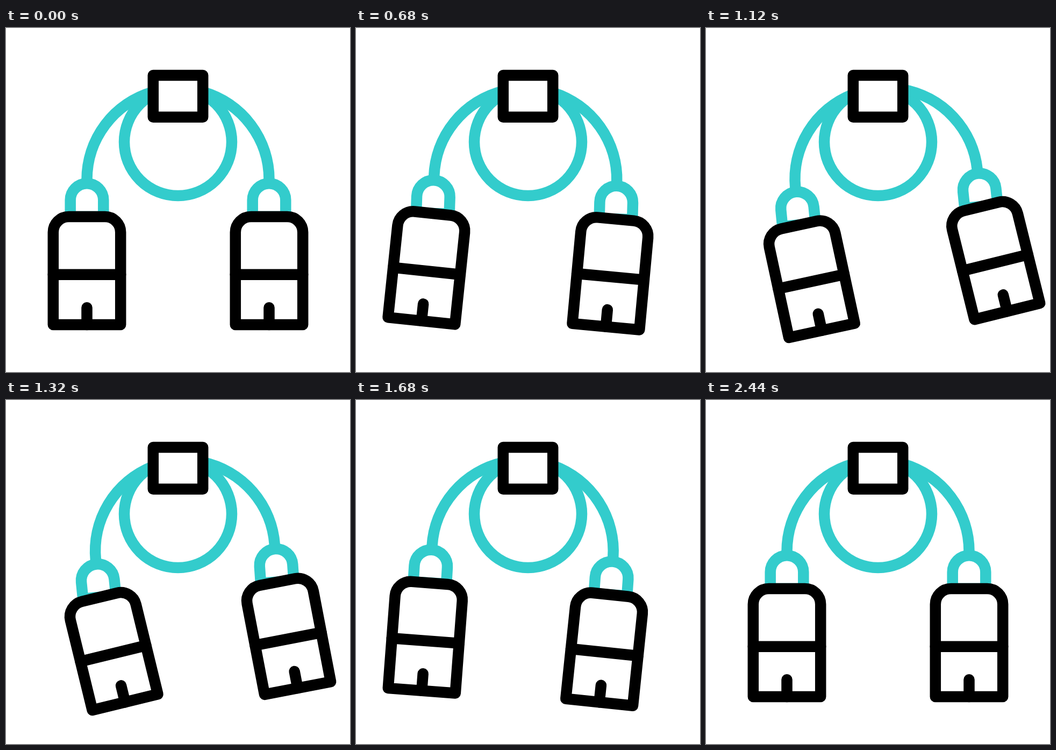
An HTML page with a canvas that plays this animation: 640 px wide and 640 px high, repeating every 3000 ms.

```html
<!DOCTYPE html>
<html lang="en">
<head>
<meta charset="utf-8">
<title>Jump rope</title>
<style>
  html, body { margin: 0; height: 100%; overflow: hidden; background: #fff; }
  canvas { display: block; width: 640px; height: 640px; }
</style>
</head>
<body>
<canvas width="640" height="640"></canvas>
<script>
const ctx = document.querySelector('canvas').getContext('2d');
const TEAL = '#33cccc', BLACK = '#000';
const LOOP = 3000, STEP = 40;
const PIVOT = { x: 320, y: 127 };
const GRIP_X = 169.5, GRIP_Y = 224; // top of a handle, relative to the pivot

// Swing keys in ms and degrees; each part follows with its own delay
const KEYS = [40, 560, 1120, 1680, 2280];
const CORD = [0, 2, -6, 4, 0];
const GRIP = [0, 4, -8, 2, 0];

// Symmetric ease: cubic-bezier(.6, 0, .4, 1)
function ease(s) {
  let lo = 0, hi = 1, u = 0.5;
  for (let i = 0; i < 24; i++) {
    u = (lo + hi) / 2;
    const v = 1 - u;
    if (1.8 * v * v * u + 1.2 * v * u * u + u * u * u < s) lo = u; else hi = u;
  }
  return u * u * (3 - 2 * u);
}

function angle(values, t) {
  const last = KEYS.length - 1;
  if (t <= KEYS[0] || t >= KEYS[last]) return 0;
  const i = KEYS.findIndex(k => k > t) - 1;
  const s = (t - KEYS[i]) / (KEYS[i + 1] - KEYS[i]);
  return (values[i] + (values[i + 1] - values[i]) * ease(s)) * Math.PI / 180;
}

function stroke(color, build, fill) {
  ctx.beginPath();
  build();
  if (fill) {
    ctx.fillStyle = fill;
    ctx.fill();
  }
  ctx.strokeStyle = color;
  ctx.stroke();
}

function drawCord(side) {
  stroke(TEAL, () => {
    ctx.save();
    ctx.scale(side, 1);
    ctx.arc(0, 155, GRIP_X, -1.29, 0);
    ctx.lineTo(GRIP_X, 162);
    ctx.restore();
  });
  stroke(TEAL, () => {
    const x = side * GRIP_X;
    ctx.arc(x, 193, 30.8, Math.PI, 0);
    ctx.lineTo(x + 30.8, GRIP_Y);
    ctx.lineTo(x - 30.8, GRIP_Y);
    ctx.closePath();
  });
}

function drawGrip() {
  stroke(BLACK, () => ctx.roundRect(-62.7, 0, 125.4, 201, [29, 29, 0, 0]), '#fff');
  stroke(BLACK, () => {
    ctx.moveTo(-62.7, 107.8);
    ctx.lineTo(62.7, 107.8);
    ctx.moveTo(0, 169.3);
    ctx.lineTo(0, 201);
  });
}

function drawSide(side, t) {
  const delay = side < 0 ? 120 : 0;
  ctx.save();
  ctx.translate(PIVOT.x, PIVOT.y);
  ctx.rotate(angle(CORD, t - delay));
  ctx.lineCap = 'butt';
  drawCord(side);
  ctx.lineCap = 'round';
  ctx.translate(side * GRIP_X, GRIP_Y);
  ctx.rotate(angle(GRIP, t - delay - 40));
  drawGrip();
  ctx.restore();
}

function frame(now) {
  const t = Math.floor(now % LOOP / STEP) * STEP;
  ctx.fillStyle = '#fff';
  ctx.fillRect(0, 0, 640, 640);
  ctx.lineWidth = 20.5;
  ctx.lineJoin = 'round';
  stroke(TEAL, () => ctx.arc(320, 212, 100, 0, 2 * Math.PI));
  drawSide(-1, t);
  drawSide(1, t);
  stroke(BLACK, () => ctx.rect(273.8, 88.1, 92.4, 77.7), '#fff');
  requestAnimationFrame(frame);
}
requestAnimationFrame(frame);
</script>
</body>
</html>
```
